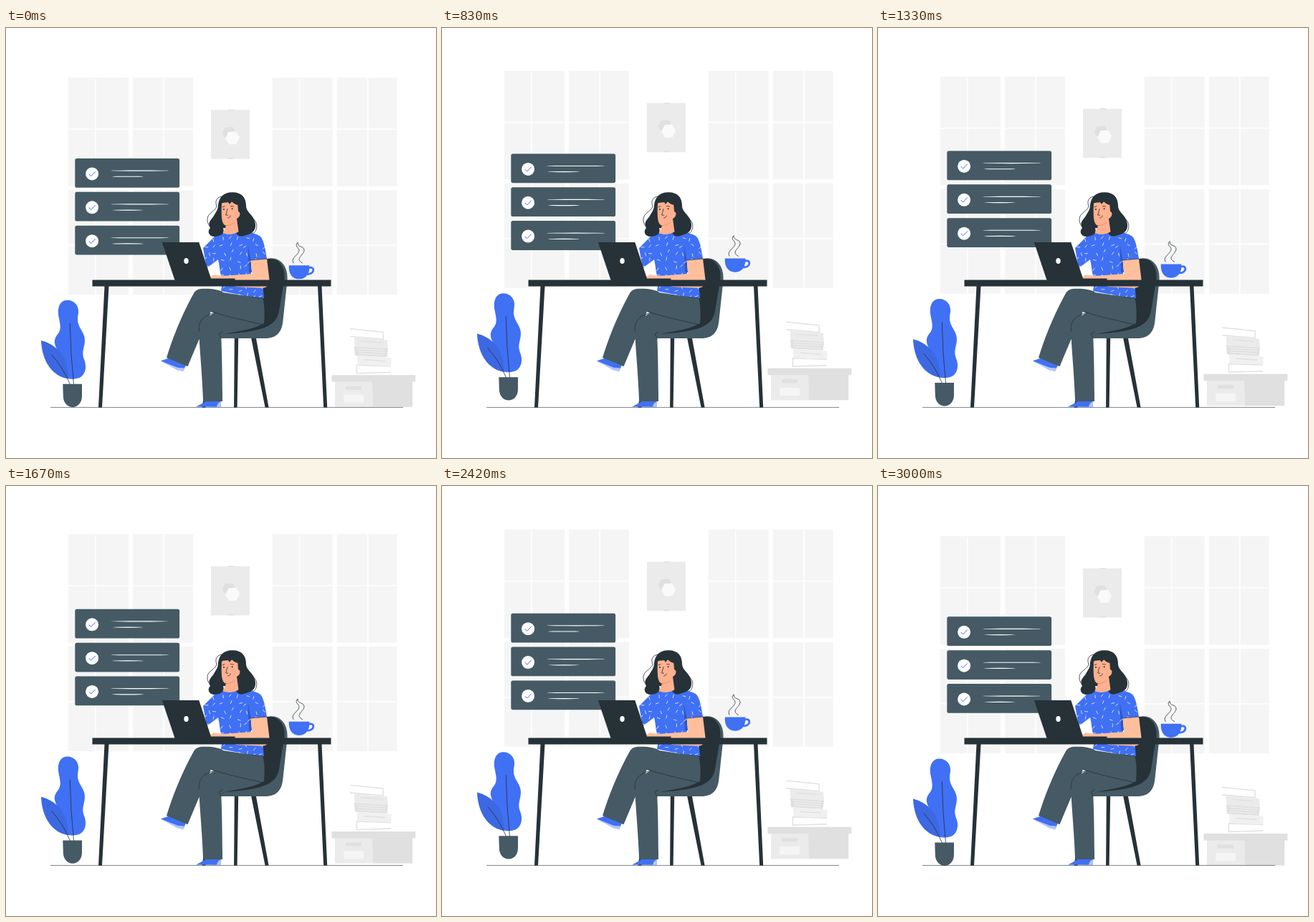
Recreate the animation shown at these times as an HTML page. Size 600 px wide and 600 px high, loop 3.04 s.

```html
<!DOCTYPE html>
<html lang="en">
<head>
<meta charset="utf-8">
<title>Woman working at a desk</title>
<style>
  html, body { margin: 0; width: 100%; height: 100%; overflow: hidden; background: #fff; }
  svg { display: block; width: 100%; height: 100%; }
  .blue { fill: #4070f4; }
  .dark { fill: #263238; }
  .slate { fill: #455a64; }
  .skin { fill: #ffbf9d; }
  .g1 { fill: #f5f5f5; }
  .g2 { fill: #ebebeb; }
  .g3 { fill: #e0e0e0; }
  .white { fill: #fff; }
  .line { fill: none; stroke: #263238; stroke-width: .8; stroke-linecap: round; stroke-linejoin: round; }
  .pale { fill: none; stroke: #e0e0e0; stroke-width: 1.4; }
</style>
</head>
<body>
<svg viewBox="0 0 600 600" xmlns="http://www.w3.org/2000/svg">
  <defs>
    <g id="window">
      <path class="g1" d="M87 70h84v151.5h-84zM177 70h84v151.5h-84zM87 227h84v146h-84zM177 227h84v146h-84z"/>
      <path d="M125 72V373M220.2 70V373M87 142H261M87 303.9H261" stroke="#fff" stroke-width="1.5"/>
    </g>
    <g id="card">
      <rect class="slate" x="96.3" y="182.3" width="145.8" height="40.8" rx="2.6"/>
      <circle class="white" cx="120.1" cy="203.8" r="9"/>
      <path d="M115.7 204l3 3 6-6.3" fill="none" stroke="#4070f4"/>
      <ellipse cx="186.8" cy="199.4" rx="41" ry=".6" fill="#fff"/>
      <ellipse cx="170" cy="207.6" rx="22" ry=".6" fill="#fff"/>
    </g>
    <path id="torso" d="M303 286C297 287 292 289 288 294L275 307 280 335 296 323C298 331 298 338 300 346L301 361 300 367 330 373 360 377 357 346 342 344 341 324 364 322C362 309 360 298 356 292 352 287 340 285 324 284Q315 290 303 286Z"/>
    <clipPath id="shirtClip"><use href="#torso"/></clipPath>
  </defs>

  <g id="room">
    <use href="#window"/>
    <use href="#window" x="284.7"/>

    <!-- poster -->
    <path class="g2" d="M286 115h54v68.5h-54z"/>
    <path class="g3" d="M310 114.4h8v1.6h-8zM309.5 181.8h8v1.7h-8z"/>
    <path class="g3" d="M305.5 139.5L316.5 138.8 321 146.5 317 153.5 306 154 301.5 147.5Z"/>
    <path fill="#fafafa" d="M310.5 145.6L321 144.8 326 153.4 321.5 162.6 311.5 163.2 306 155Z"/>

    <!-- plant -->
    <path class="blue" d="M85 380.4C95 380 102 388 101 398 99 410 100 413 105 422 111 432 111 437 108 449 105 461 112 464 111 475 110 486 103 491 91 490.5 79 489 69 481 69 470 76 459 74 456 71 449 66 439 67 434 73 427 78 420 75 412 73 401 72 390 75 381 85 380.4Z"/>
    <path fill="#3c68e2" d="M49 436.6C67 441 82 455 85 474L87 490C65 487 50 466 49 436.6Z"/>
    <path class="line" d="M89.3 413Q90 455 94.5 498M64 457Q79 473 89.5 498"/>
    <path class="slate" d="M79.3 497.4H106V514C106 535 80 535 79.8 514Z"/>

    <!-- storage box -->
    <path class="g3" d="M511 494h56.3v35.5H511z"/>
    <path class="g2" d="M459 494H511L512.3 529.5H459Z"/>
    <path class="g3" d="M454.4 485h117v9.5h-117z"/>
    <rect class="g3" x="474" y="500.5" width="22" height="5" rx="1"/>
    <rect class="g1" x="471" y="512.3" width="28" height="11" rx="1"/>

    <!-- books -->
    <path class="pale" stroke-width="2" d="M480 420.3L526 425 526.5 434.8 480 431"/>
    <path class="g2" d="M485.5 432.5L532 436 533 448 486.5 445Z"/>
    <path class="g3" d="M486 445L533 448 531.5 460 487 457.5Z"/>
    <path d="M490 448L530 450.5M491 451.3L529 453.5M491 454.5L529 457" stroke="#f2f2f2" fill="none"/>
    <path fill="#f0f0f0" d="M490 457.5L537.5 461V471.5L490.5 470Z"/>
    <path class="pale" stroke-width="1.6" d="M495 437.4L524 439.6M500 463.5L529 465.5"/>
    <path class="pale" d="M537 472.5L489.5 471 489.5 482.5 537 481"/>

    <!-- cup -->
    <path class="blue" d="M394.8 331.8H423.4C424 343 419 351 409 351 399 351 394 343 394.8 331.8Z"/>
    <path d="M422 335.5C432 332 431 345 420 344" fill="none" stroke="#4070f4" stroke-width="2.8"/>
    <path class="line" d="M401 328.5C396 321 410 317 409 310.5 408.5 307 402 305 407 300 407 308 416 304 416 311 416 317 402 323 413.5 328.5"/>
  </g>

  <path d="M62 529.4H554" stroke="#263238" stroke-width=".6"/>

  <g id="cards">
    <use href="#card"/>
    <use href="#card" y="46.85"/>
    <use href="#card" y="93.7"/>
  </g>

  <!-- chair -->
  <path class="dark" d="M318.8 432H324.2L322.6 529.6H318.1ZM342 432H348.8L366.6 529.6H361.6ZM289 432H296L278.5 529.6H273.5Z"/>
  <path class="slate" d="M364 322C382 318 394 332 392.5 352L386.5 408C385 424 378 433 362 433H300V425Z"/>
  <path class="dark" d="M361 323C379 318 390 331 388.5 350L381 395C377 416 360 424 300 427L340 380Z"/>

  <!-- shoes -->
  <path class="blue" d="M216 464.5L229 460 251 470.5 247 479 239 476Z"/>
  <path fill="#b3c6fb" d="M216 464.5L240 474 249 474.5 247 479 239 477.5Z"/>
  <path class="blue" d="M265 528.6Q271 526 278 521H299.5V528.8Z"/>
  <path fill="#b3c6fb" d="M294 528.8Q295 523 299.5 521.5V528.8Z"/>

  <!-- shirt -->
  <use class="blue" href="#torso"/>
  <path fill="#2f57c4" d="M337.5 303L341.5 323 343 341 339 341Z"/>
  <g id="dashes" clip-path="url(#shirtClip)" stroke="#e6ecfd" stroke-width=".9"></g>

  <!-- trousers -->
  <path class="slate" d="M271 364C285 363 299 365 303 369L358.5 377.5C361 388 361 401 360 412 345 421 318 424 300 428 301 440 302 480 302 521H275C274 485 270 448 269 420 269 410 275 403 283.5 401L253.5 472.2 224 460C234 428 247 397 261 372Q264 365 271 364Z"/>
  <path class="white" d="M286 395.2L290.5 397.6 283.8 401.4Z"/>
  <path class="line" d="M286 395.4C312 404 338 409 359 414M291 397.5C277 401 268 407 269.2 423M302 424L297 427 300 433"/>

  <!-- hair and head -->
  <path class="dark" d="M316 229.2C329 229 335 237 335 248 335 258 347 261 348 274 349 286 339 288 332 290 325 292 320 288 321 281L303 279C306 288 298 291 290 291 282 290 281 283 285 279 280 271 288 266 290 262 294 255 296 253 296 247 297 236 304 229 316 229.2Z"/>
  <path class="line" d="M301 235C292 237 292 243 294 249 291 257 281 258 281 267 281 273 284 277 287 278M340 263C350 268 351 275 349 281 348 285 346 287 343 286"/>
  <path fill="#ffb08f" d="M301 244L323 242 324 256C328 257 327 264 322 266L324.5 284.3Q315 290 303 286.2L307 275.8C301 274 300 265 301 244Z"/>
  <path class="dark" d="M299 248C301 243 306 243 308 240L312 246 315 242C319 247 323 246 325 248L329 239 318 232 301 237Z"/>
  <circle class="dark" cx="304" cy="253" r="1"/>
  <circle class="dark" cx="315.6" cy="252.3" r="1"/>
  <path class="line" d="M302 249.8L305 248.8M313.5 248.5L317.5 249M309 252.5L306.7 261 309.6 261.2M309.6 265Q312.5 265.3 313.2 262"/>
  <path d="M307 275.8Q314 276 319 271.5" fill="none" stroke="#e98a68" stroke-width=".8"/>

  <!-- arm -->
  <path class="skin" d="M341.5 324L364 322 367.5 351C368 358 364 362.8 357 362.8L320 361V352H289L284 347.5 290 344.2 303 346 343.5 343Z"/>
  <path class="line" d="M341.5 324L364 322" stroke-width=".5"/>

  <!-- desk -->
  <path class="dark" d="M137.5 360H143.5L134 529.6H129ZM435 360H440.5L448.2 529.6H443.2Z"/>
  <path class="dark" d="M120.5 351.5h333v9.1h-333z"/>

  <!-- laptop -->
  <path class="dark" d="M217.8 299H269.3L286 349.6H319.5V352H235.6Z"/>
  <ellipse class="white" cx="251.5" cy="325" rx="3.2" ry="4.1"/>
</svg>

<script>
  const LOOP = 3040, FRAMES = 73, LIFT = 12;
  const room = document.getElementById('room');
  const cards = document.getElementById('cards');

  // Dashes scattered over the shirt on a jittered grid
  let seed = 11;
  const rand = () => (seed = seed * 16807 % 2147483647) / 2147483647;
  let dashes = '';
  for (let y = 291; y < 378; y += 10) {
    for (let x = 278; x < 364; x += 11) {
      const px = x + rand() * 6, py = y + rand() * 6, a = rand() * Math.PI;
      const dx = 2.4 * Math.cos(a), dy = 2.4 * Math.sin(a);
      dashes += `M${px - dx} ${py - dy}l${2 * dx} ${2 * dy}`;
    }
  }
  document.getElementById('dashes').innerHTML = `<path d="${dashes}"/>`;

  // Linear rise and fall: 0 at whole cycles, -LIFT halfway
  const float = cycles => -LIFT * (1 - Math.abs(1 - 2 * (cycles % 1)));
  const shift = (el, y) => el.setAttribute('transform', `translate(0 ${y.toFixed(3)})`);

  // Motion is held at 24 steps a second, on 10 ms ticks
  function draw(now) {
    const t = Math.floor((now % LOOP) / 10) * 10;
    const step = Math.min(FRAMES - 1, Math.floor((t + 4) * 24 / 1000));
    const phase = (step + 1) / FRAMES;
    shift(room, float(phase * 2));
    shift(cards, float(phase));
  }

  function tick() {
    draw(performance.now());
    requestAnimationFrame(tick);
  }
  tick();
</script>
</body>
</html>
```
